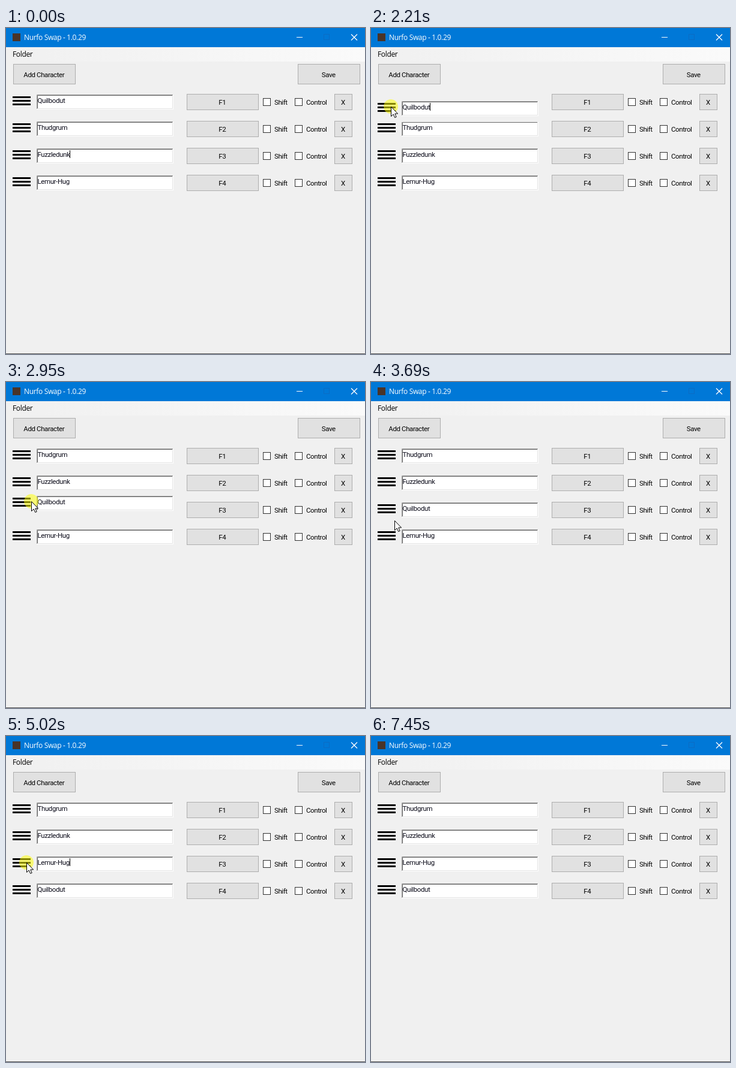
Animation of 598 by 544 pixels, one loop 7.95 s. Source, as an HTML page:

```html
<!DOCTYPE html>
<html lang="en">
<head>
<meta charset="utf-8">
<title>Nurfo Swap</title>
<style>
  html, body { margin: 0; width: 100%; height: 100%; overflow: hidden; background: #f0f0f0; }
  svg { display: block; width: 598px; height: 544px; }
  text { font: 11.5px Roboto, "Liberation Sans", sans-serif; letter-spacing: -0.4px; white-space: pre; }
  .system { font: 12px "Open Sans", "Noto Sans", sans-serif; letter-spacing: -0.35px; }
  .middle { text-anchor: middle; }
</style>
</head>
<body>
<svg viewBox="0 0 598 544" xmlns="http://www.w3.org/2000/svg">
  <defs>
    <linearGradient id="menu">
      <stop offset="0" stop-color="#f0f0f0"/>
      <stop offset="1" stop-color="#fafafa"/>
    </linearGradient>
  </defs>
  <rect width="598" height="544" fill="#f0f0f0"/>
  <rect width="598" height="32" fill="#0078d7"/>
  <rect x="11" y="9" width="13" height="13" fill="#4a3428"/>
  <text class="system" x="30" y="20" fill="#fff">Nurfo Swap - 1.0.29</text>
  <path d="M484 15.5h10" stroke="#fff"/>
  <path d="M575 10.5l10 10M585 10.5l-10 10" stroke="#fff" stroke-width="1.3"/>
  <rect x="529.5" y="10.5" width="9" height="9" fill="none" stroke="#0b6cc4"/>
  <rect y="32" width="598" height="24" fill="url(#menu)"/>
  <text class="system" x="11" y="48">Folder</text>
  <rect y="543" width="598" height="1" fill="#555"/>
  <g id="controls"></g>
  <g id="rows"></g>
  <rect id="caret" width="1" height="13"/>
  <circle id="press" r="12" fill="#ff0" fill-opacity=".52"/>
  <path id="arrow" d="M.5 .5V16.5L4.2 13L6.7 18.5L9.2 17.4L6.8 12H11.6Z" fill="#fff" stroke="#000"/>
  <path id="beam" d="M-3 -7.5H-1L.5 -6.5L2 -7.5H4M.5 -6.5V6.5M-3 7.5H-1L.5 6.5L2 7.5H4" fill="none" stroke="#000"/>
</svg>
<script>
const LOOP = 7950;
const PITCH = 45;
const SWAP_DISTANCE = 43;
const BLINK = 530;
const TEXT_X = 52.5;
const names = ["Quilbodut", "Thudgrum", "Fuzzledunk", "Lemur-Hug"];
const el = id => document.getElementById(id);

// The pointer rests between moves.
const home = { x: 240, y: 560 };
const moves = [
  { from: 640, to: 1170, x: -14, y: 300 },
  { from: 1170, to: 1350, x: -14, y: 190 },
  { from: 1350, to: 1580, x: 29, y: 120 },
  { from: 2060, to: 2210, x: 33, y: 131 },
  { from: 2210, to: 2960, x: 42, y: 200 },
  { from: 3380, to: 3950, x: 36, y: 256 },
  { from: 4420, to: 5180, x: 34, y: 200 },
  { from: 5860, to: 6050, x: 57, y: 206 },
  { from: 6250, to: 7070, x: 401, y: 368 },
  { from: 7090, to: 7450, x: 575, y: 560 }
];

// The caret stays lit from focus until its blink clock starts.
const firstFocus = { who: 2, blink: -30 };
const drags = [
  { who: 0, down: 1850, focus: 1920, blink: 1920, up: 3380 },
  { who: 3, down: 4180, focus: 4310, blink: 4800, up: 5680 }
];

function button(x, y, w, h, label) {
  return `<rect x="${x + .5}" y="${y + .5}" width="${w - 1}" height="${h - 1}" fill="#e1e1e1" stroke="#adadad"/>
    <text class="middle" x="${x + w / 2 - .7}" y="${y + h / 2 + 4.5}">${label}</text>`;
}

function checkbox(x, y, label) {
  return `<rect x="${x + .5}" y="${y + .5}" width="12" height="12" fill="#fff" stroke="#333"/>
    <text x="${x + 19}" y="${y + 11}">${label}</text>`;
}

function rowControls(i) {
  const y = 110 + i * PITCH;
  return button(301, y, 120, 27, "F" + (i + 1)) + checkbox(428, y + 7, "Shift")
    + checkbox(481, y + 7, "Control") + button(547, y, 30, 27, "X");
}

function characterRow(name) {
  return `<g>
    <rect x="5" y="101" width="280" height="${PITCH}" fill="#f0f0f0"/>
    <path d="M11 115.5h30M11 121.5h30M11 127.5h30" stroke="#000" stroke-width="3"/>
    <rect x="51" y="111" width="228" height="25" fill="#fff"/>
    <path d="M51.5 135V111.5H278" fill="none" stroke="#a0a0a0"/>
    <path d="M52.5 134V112.5H277" fill="none" stroke="#696969"/>
    <path d="M52 134.5H277.5V112" fill="none" stroke="#e3e3e3"/>
    <text x="${TEXT_X}" y="125" fill="#0a0a18">${name}</text>
  </g>`;
}

el("controls").innerHTML = button(12, 60, 104, 34, "Add Character")
  + button(486, 60, 104, 34, "Save") + names.map((_, i) => rowControls(i)).join("");

// Earlier rows lie on top of later ones.
el("rows").innerHTML = names.map(characterRow).reverse().join("");
const rows = [...el("rows").children].reverse();
const caretX = rows.map(row =>
  Math.round(TEXT_X + row.querySelector("text").getComputedTextLength()));

const ease = k => k - .12 * Math.sin(2 * Math.PI * k) / (2 * Math.PI);

function pointerAt(t) {
  let { x, y } = home;
  for (const move of moves) {
    if (t < move.from) break;
    const k = ease(Math.min(1, (t - move.from) / (move.to - move.from)));
    x += (move.x - x) * k;
    y += (move.y - y) * k;
  }
  return { x: Math.round(x), y: Math.round(y) };
}

function rowOffsets(t) {
  const order = names.map((_, i) => i);
  let held = null;
  for (const { who, down, up } of drags) {
    if (t < down) break;
    const slot = order.indexOf(who);
    const moved = pointerAt(Math.min(t, up)).y - pointerAt(down).y;
    order.splice(slot, 1);
    order.splice(slot + Math.round(moved / SWAP_DISTANCE), 0, who);
    if (t < up) held = { who, y: slot * PITCH + moved };
  }
  const offsets = names.map((_, i) => order.indexOf(i) * PITCH);
  if (held) offsets[held.who] = held.y;
  return offsets;
}

function place(node, x, y, visible = true) {
  node.setAttribute("transform", `translate(${x} ${y})`);
  node.setAttribute("visibility", visible ? "visible" : "hidden");
}

function render(t) {
  const pointer = pointerAt(t);
  const offsets = rowOffsets(t);
  rows.forEach((row, i) => place(row, 0, offsets[i]));

  const { who, blink } = drags.reduce((last, drag) => t >= drag.focus ? drag : last, firstFocus);
  const lit = Math.floor(Math.max(0, t - blink) / BLINK) % 2 === 0 && t < moves.at(-1).to;
  place(el("caret"), caretX[who], 114 + offsets[who], lit);

  const pressed = drags.some(({ down, up }) => t >= down && t < up);
  const overText = pointer.x > 51 && pointer.x < 278
    && offsets.some(y => pointer.y >= 111 + y && pointer.y < 136 + y);
  place(el("press"), pointer.x, pointer.y, pressed);
  place(el("arrow"), pointer.x, pointer.y, !overText);
  place(el("beam"), pointer.x, pointer.y, overText);
}

let start;
function tick(now) {
  start ??= now;
  render((now - start) % LOOP);
  requestAnimationFrame(tick);
}
render(0);
requestAnimationFrame(tick);
</script>
</body>
</html>
```
